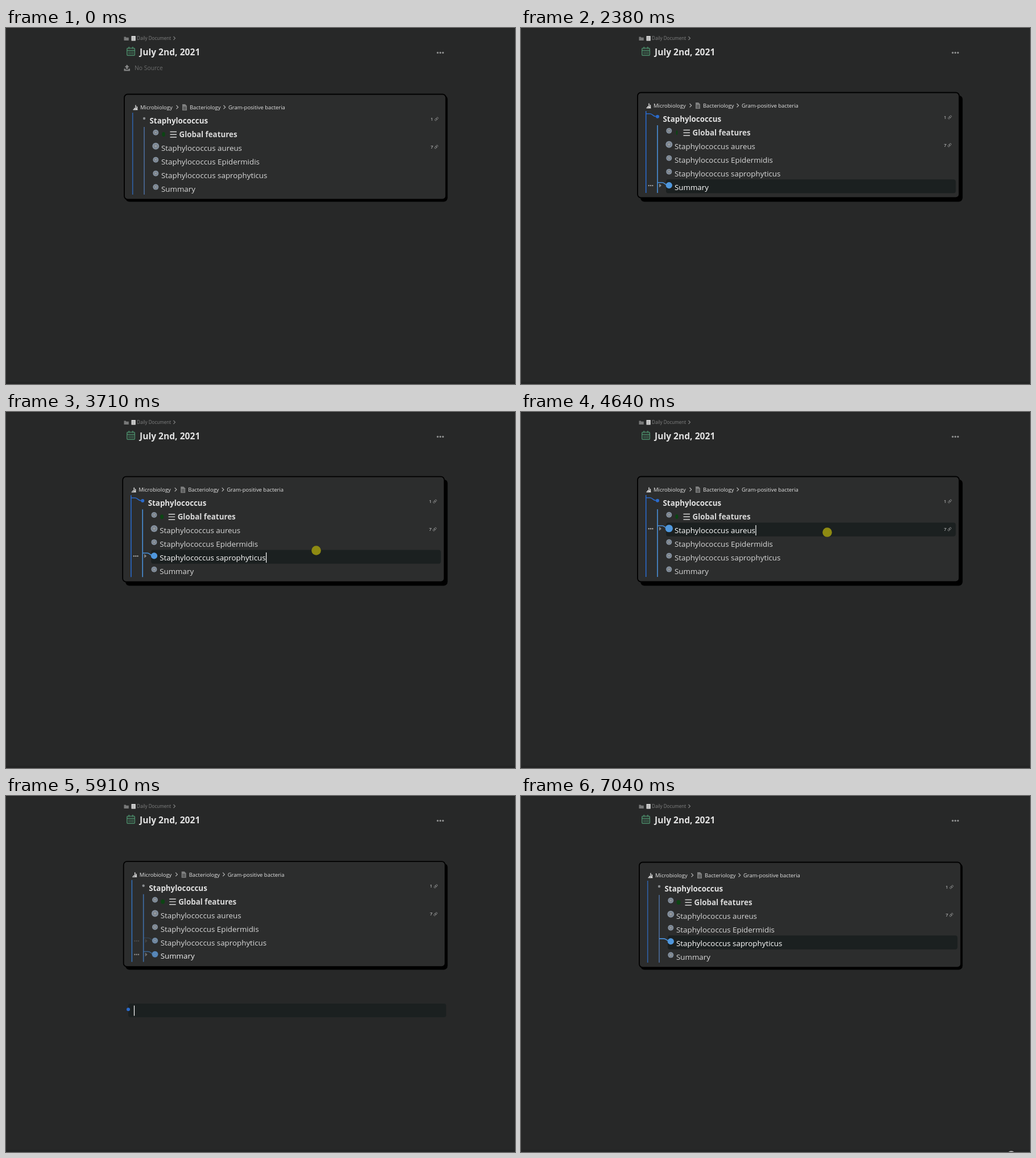
Recreate the animation shown at these times as an HTML page. Size 895 px wide and 626 px high, loop 7.11 s.

```html
<!DOCTYPE html>
<html lang="en">
<head>
<meta charset="utf-8">
<title>Daily document</title>
<style>
html, body { margin: 0; width: 100%; height: 100%; overflow: hidden; background: #272828; }
svg { display: block; }
text { font-family: "Open Sans", "Noto Sans", sans-serif; font-size: 13.35px; fill: #d8d8d8; white-space: pre; }
.bold { font-weight: 700; }
.crumb { font-size: 9.45px; fill: #e4e4e4; }
.count { font-size: 8px; fill: #e0e0e0; }
.line { fill: none; stroke-width: 1.6; }
.chevron { fill: none; stroke: #bcbcbc; stroke-width: 1.1; }
</style>
</head>
<body>
<svg width="895" height="626" viewBox="0 0 895 626">
  <defs>
    <g id="link" fill="none" stroke="#8b8c8c" stroke-width=".9" transform="rotate(-45)">
      <rect x="-3.6" y="-1.4" width="4.2" height="2.8" rx="1.4"/>
      <rect x="-.6" y="-1.4" width="4.2" height="2.8" rx="1.4"/>
    </g>
    <g id="dots">
      <circle cx="-3.3" r="1.2"/><circle r="1.2"/><circle cx="3.3" r="1.2"/>
    </g>
  </defs>
  <rect width="895" height="626" fill="#272828"/>
  <rect width="895" height="1" fill="#202121"/>
  <rect y="622" width="895" height="4" fill="#232424"/>

  <path d="M207.5 15.5h3l1 1.2h4.3v5.3h-8.300z" fill="#777878"/>
  <path d="M220.500 14h7.300v8.500h-7.300z" fill="#d6d6d6"/>
  <path d="M222 16.500h4M222 18.500h4M222 20.500h4" stroke="#8f9090" stroke-width=".7"/>
  <text x="230" y="21.300" style="font-size:8.1px;fill:#818282">Daily Document</text>
  <path class="chevron" d="M294.500 15l3 3-3 3" style="stroke:#818282"/>

  <g fill="none" stroke="#4b8a69" stroke-width="1.500">
    <rect x="212.800" y="35.500" width="13.500" height="12.800" rx="1.500"/>
    <path d="M213 39.500h13M216.300 33v3.500M222.800 33v3.500"/>
    <path d="M215.500 42.500h9M215.500 45.300h9" stroke-dasharray="2 1.300"/>
  </g>
  <text x="235" y="48.300" class="bold" style="font-size:15.6px;fill:#e2e2e2">July 2nd, 2021</text>
  <use href="#dots" fill="#8d8e8e" transform="translate(763.700 43.500) scale(1.400)"/>
  <g id="noSource">
    <path d="M212.700 64.500l4 4.500h-2.500v3h-3v-3h-2.500zM207.500 71.500h2.500v1.700h5.500v-1.700h2.500v4h-10.500z" fill="#858686"/>
    <text x="226" y="74.400" style="font-size:10.35px;fill:#6c6d6d">No Source</text>
  </g>

  <rect x="210" y="118.500" width="566.500" height="187" rx="7"/>
  <g id="card">
    <rect x="208" y="116.500" width="565.500" height="185" rx="6" fill="#2c2d2d" stroke="#000" stroke-width="1.800"/>
    <path d="M223.500 143.500h8M225 141.500h4.500M228 135.500v5M230 138q1.500 3-.5 5" fill="none" stroke="#eee" stroke-width="1.300"/>
    <text x="236" y="143.200" class="crumb">Microbiology</text>
    <path class="chevron" d="M299.500 136l3.200 3.200-3.200 3.200"/>
    <path d="M310 134h5l3 3v8h-8z" fill="#7f8080"/>
    <path d="M311.500 139h5M311.500 141h5M311.500 143h5" stroke="#2c2d2d" stroke-width=".8"/>
    <text x="323" y="143.200" class="crumb">Bacteriology</text>
    <path class="chevron" d="M382.500 136l3.200 3.200-3.200 3.200"/>
    <text x="391" y="143.200" class="crumb">Gram-positive bacteria</text>
    <g id="highlights"></g>
    <path id="outerLine" class="line" d="M222.700 149V293"/>
    <path id="innerLine" class="line" d="M243 174V293"/>
    <circle cx="243" cy="159" r="2.200" fill="#8a8d90"/>
    <g id="parentLink">
      <path class="line" stroke="#2a6acb" d="M222.700 153.800h7c5 0 5 4.500 10 4.700h3"/>
      <circle cx="243" cy="158.800" r="3" fill="#2a6acb"/>
    </g>
    <text x="252.500" y="168" class="bold" style="fill:#e2e2e2">Staphylococcus</text>
    <ellipse id="spinner" cx="277" cy="187" ry="4" fill="#0b4513"/>
    <path d="M288.500 182.500h11.500M288.500 187.200h11.500M288.500 192h11.500" stroke="#d8d8d8" stroke-width="1.400"/>
    <text x="746.500" y="162.700" class="count">1</text><use href="#link" x="0" transform="translate(757 160)"/>
    <g id="rows"></g>
    <text x="746.500" y="211.700" class="count">7</text><use href="#link" transform="translate(756.500 209)"/>
  </g>

  <rect id="blankBar" x="215" y="365" width="559" height="24" rx="4" fill="#1b2020"/>
  <g id="blanks"></g>
  <path id="blankArrow" d="M198.500 370.500l4 3-4 3z" fill="#777"/>
  <circle id="blankBullet" cx="215" cy="375.300" r="3" fill="#2a6acb"/>
  <path id="caret" stroke="#fff" stroke-width="1.200"/>
  <circle id="click" r="8.300" fill="#8e8a12"/>
  <path id="pointer" d="M-2.500-5.500q2.500 0 2.500 1.500q0-1.500 2.500-1.500M0-4v8M-2.500 5.500q2.500 0 2.500-1.500q0 1.500 2.500 1.500" fill="none" stroke="#dcdcdc" stroke-width="1.200"/>
  <ellipse id="edgePointer" cx="862" cy="627" rx="5" ry="3" fill="#a9aaaa"/>
</svg>
<script>
const LOOP = 7110, STEP = 66.5, START = 790;
const BLANK = 5;
const $ = id => document.getElementById(id);

function add(parent, tag, attrs, text = '') {
  const el = document.createElementNS('http://www.w3.org/2000/svg', tag);
  for (const key in attrs) el.setAttribute(key, attrs[key]);
  el.textContent = text;
  parent.append(el);
  return el;
}
const show = (el, amount) => { el.style.opacity = +amount; };

const labels = ['Global features', 'Staphylococcus aureus', 'Staphylococcus Epidermidis',
  'Staphylococcus saprophyticus', 'Summary'];

const rows = labels.map((label, i) => {
  const base = 192 + i * 23.95, y = base - 8.2, r = i === 1 ? 6 : 5;
  const g = $('rows');
  const bar = add($('highlights'), 'rect', { x: 258, y: base - 18.500, width: 509.5, height: 24.300, rx: 4, fill: '#1b2020' });
  add(g, 'circle', { cx: 263.3, cy: y, r, fill: '#84909e' });
  add(g, 'circle', { cx: 263.3, cy: y, r: r * .48, fill: '#969a9d', stroke: '#66707b', 'stroke-width': .9 });
  const active = add(g, 'g', {});
  const link = add(active, 'path', { class: 'line', d: `M243 ${y - 4.800}h8c5 0 5 4.600 12 4.800` });
  const dot = add(active, 'circle', { cx: 263.3, cy: y, r: r + .6 });
  const tools = add(g, 'g', {});
  add(tools, 'use', { href: '#dots', fill: '#aaa', transform: `translate(231 ${y + .5})` });
  add(tools, 'path', { d: `M246 ${y - 3}l4 3.500-4 3.500z`, fill: '#858686' });
  const text = add(g, 'text', { x: i ? 273 : 304.5, y: base, class: i ? '' : 'bold' }, label);
  return { base, bar, active, link, dot, tools, text };
});

const blanks = [326, 350.5, 373.3].map(cy => add($('blanks'), 'circle', { cx: 215, cy, r: 2, fill: '#d4d4d4' }));

// Pointer path: time, x, y
const path = [
  [790, 851, 619], [1120, 700, 450], [1430, 556, 301], [1520, 550, 282], [1850, 548, 276],
  [2330, 548, 276], [2520, 546, 300], [2850, 542, 379], [3050, 541, 399], [3110, 541, 399],
  [3400, 543, 305], [3640, 547, 244], [4120, 547, 244], [4370, 540, 209], [4640, 540, 209],
  [4880, 539, 300], [5170, 537, 370], [5240, 537, 370], [5400, 537, 377], [5600, 537, 377],
  [5775, 541, 302], [5910, 545, 259], [6110, 546, 254], [6400, 546, 254], [6840, 840, 619], [7030, 840, 619]
];

// Clicks: time, row that takes focus, time the ring stays
const clicks = [[1850, 4, 140], [3710, 3, 200], [4510, 1, 190], [5440, BLANK, 200], [6240, 3, 200]];

function pointerAt(t) {
  const next = path.findIndex(p => p[0] > t);
  if (next < 1) return null;
  const [t0, x0, y0] = path[next - 1], [t1, x1, y1] = path[next];
  const k = (t - t0) / (t1 - t0);
  return { x: x0 + (x1 - x0) * k, y: y0 + (y1 - y0) * k };
}

const inColumn = p => p && p.x > 205 && p.x < 776;
const overCard = t => { const p = pointerAt(t); return inColumn(p) && p.y > 114 && p.y < 303; };
const overRow = (t, i) => overCard(t) && Math.min(4, Math.floor((pointerAt(t).y - 171) / 24)) === i;
const overBlank = (t, i) => {
  const p = pointerAt(t);
  return inColumn(p) && p.y > 314 && Math.min(2, Math.floor((p.y - 314) / 24)) === i && p.y < 406;
};

// Share of the last `span` ms in which a test held: a linear fade.
function fade(test, t, span) {
  let sum = 0;
  for (let k = 0; k < 16; k++) sum += test(t - span * k / 16) ? 1 : 0;
  return sum / 16;
}

function draw(time) {
  const t = START + Math.floor((time - START + 10) / STEP) * STEP + 1;
  const lift = -3 * fade(overCard, t, 340);
  const click = clicks.filter(c => c[0] <= t + 8).pop();
  const focus = click ? click[1] : -1;
  const inCard = focus >= 0 && focus < BLANK && t < 7035;
  const hovering = fade(overCard, t, 120);

  $('card').setAttribute('transform', `translate(${lift} ${lift})`);
  show($('noSource'), t < 1980);
  show($('parentLink'), inCard);
  $('outerLine').setAttribute('stroke', inCard ? '#2a6acb' : hovering > .3 ? '#3470b8' : '#2f62a8');
  $('innerLine').setAttribute('stroke', inCard ? '#4a90d9' : hovering > .3 ? '#416fa8' : '#4d6c9c');
  $('spinner').setAttribute('rx', 1 + 2.4 * Math.abs(Math.cos((t - START) / 330)));

  rows.forEach((row, i) => {
    const focused = focus === i;
    const hover = fade(s => overRow(s, i), t, 110);
    show(row.bar, focused);
    show(row.active, focused ? 1 : hover);
    row.link.setAttribute('stroke', focused ? '#4a90d9' : '#4478b0');
    row.dot.setAttribute('fill', focused ? '#4f97dc' : '#4a86c4');
    show(row.tools, hover);
    row.text.style.fill = focused ? '#fff' : hover > .3 ? '#f0f0f0' : '#d8d8d8';
  });

  const blankFocus = focus === BLANK;
  show($('blankBar'), blankFocus);
  show($('blankBullet'), blankFocus);
  blanks.forEach((dot, i) => show(dot, blankFocus && i === 2 ? 0 : fade(s => overBlank(s, i), t, 150)));
  show($('blankArrow'), overBlank(t, 2) ? fade(s => overBlank(s, 2), t - 200, 100) : 0);

  const caretOn = click && (t - click[0]) % 1060 < 525;
  show($('caret'), caretOn);
  if (caretOn) {
    const row = rows[focus];
    const x = row ? 274 + row.text.getComputedTextLength() + lift : 225.5;
    const y = row ? row.base + lift - 14 : 368.5;
    $('caret').setAttribute('d', `M${x} ${y}v18`);
  }

  const p = pointerAt(t);
  show($('pointer'), p);
  show($('edgePointer'), t > 7035);
  show($('click'), p && click && t < click[0] + click[2] - 5);
  if (p) {
    $('pointer').setAttribute('transform', `translate(${p.x} ${p.y})`);
    $('click').setAttribute('transform', `translate(${p.x - 1.5} ${p.y - .5})`);
  }
}

const begin = performance.now();
function tick() {
  draw((performance.now() - begin) % LOOP);
  requestAnimationFrame(tick);
}
tick();
</script>
</body>
</html>
```
